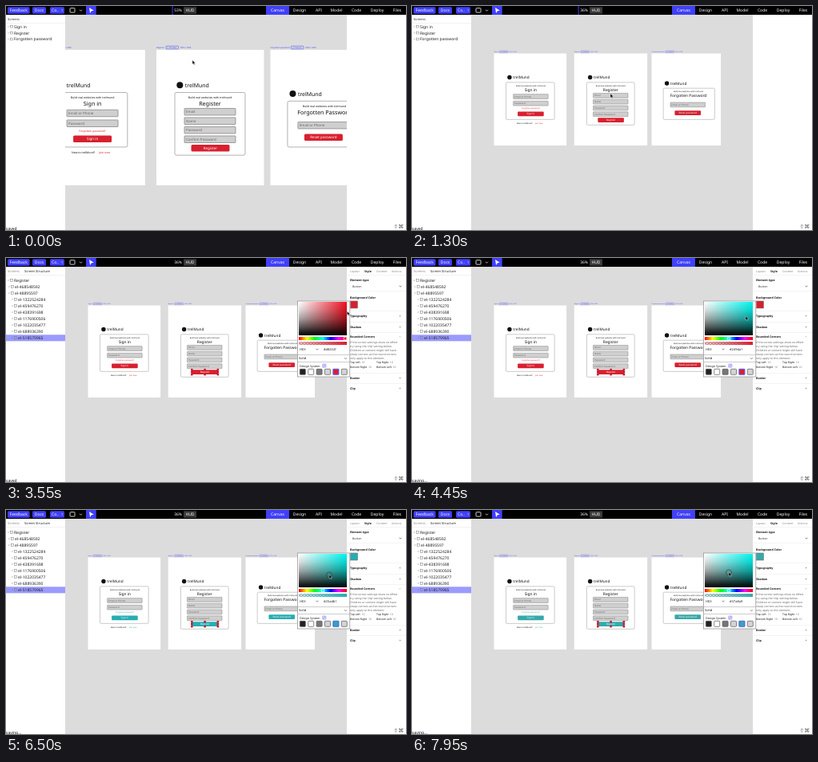
Write an HTML page that moves like this. It is 500 px wide and 281 px high and loops after 8000 ms.

```html
<!DOCTYPE html>
<html lang="en">
<head>
<meta charset="utf-8">
<title>Design editor</title>
<style>
  html, body { margin: 0; width: 100%; height: 100%; overflow: hidden; background: #fff; }
  svg { display: block; width: 100vw; height: 100vh; --accent: #d8202f; }
  text { font-family: "Noto Sans", "Open Sans", sans-serif; text-rendering: geometricPrecision; white-space: pre; }
</style>
</head>
<body>
<svg id="stage" viewBox="0 0 500 281" preserveAspectRatio="none"></svg>
<script>
const LOOP = 8000, SELECT = 1950, OPEN_PICKER = 3250, PICK_HUE = 3800, RECOLOR = 4650;
const BLUE = '#4040f8', BRAND = 'trelMund', ACCENT = 'var(--accent)';
const FOCUS = [234, 69];

const rect = (x, y, w, h, fill, extra = '') =>
  `<rect x="${x}" y="${y}" width="${w}" height="${h}" fill="${fill}" ${extra}/>`;
const text = (x, y, size, str, fill = '#111', extra = '') =>
  `<text x="${x}" y="${y}" font-size="${size}" fill="${fill}" ${extra}>${str}</text>`;
const centered = (x, y, size, str, fill, extra = '') =>
  text(x, y, size, str, fill, 'text-anchor="middle" ' + extra);
const line = (d, color = '#555', width = .6) =>
  `<path d="${d}" fill="none" stroke="${color}" stroke-width="${width}"/>`;
const chevron = (x, y, color) => line(`M${x - 1.5} ${y - .8}l1.5 1.6 1.5-1.6`, color, .7);
const group = (id, body) => `<g id="${id}">${body}</g>`;

// Mock-up screens, in stage pixels at 53 % zoom
const input = (x, y, label) =>
  rect(x, y, 64, 8.5, '#cfcfcf', 'stroke="#888" stroke-width=".8" rx=".5"') + text(x + 2, y + 5.8, 4.4, label, '#666');
const button = (x, y, label) =>
  rect(x, y, 48, 8.5, ACCENT, 'rx="1.5"') + centered(x + 24, y + 5.8, 4.5, label, '#fff', 'font-weight="500"');

function screen({ x, width, name, nameWidth, logoX, formX, formWidth, top, formHeight, title, middle, body }) {
  const tag = x + nameWidth + 2;
  return text(x, 53, 2.55, name, BLUE)
    + rect(tag, 50.2, 15.5, 3.8, 'none', `stroke="${BLUE}" stroke-width=".5" rx=".6"`)
    + text(tag + 1.5, 53, 2.5, '▷ Preview', BLUE)
    + text(tag + 18, 53, 2.6, '600 x 1200', BLUE)
    + rect(x, 55, width, 170, '#fff')
    + `<circle cx="${logoX}" cy="${top - 9.2}" r="4" fill="#111"/>`
    + text(logoX + 6.5, top - 6.7, 6.9, BRAND)
    + rect(formX, top, formWidth, formHeight, '#fff', 'stroke="#aaa" stroke-width=".9" rx="2"')
    + centered(middle, top + 7.6, 3.48, 'Build real websites with ' + BRAND.toLowerCase())
    + centered(middle, top + 16.5, 7.15, title)
    + body;
}

const handles = [231.5, 255.5, 279.5].flatMap(x =>
  [174, 178.2, 182.5].filter(y => x !== 255.5 || y !== 178.2)
    .map(y => rect(x - 1.9, y - 1.9, 3.8, 3.8, '#c8182e'))).join('');

const screens = [
  screen({
    x: 40.4, width: 133.4, name: 'Sign in', nameWidth: 8, logoX: 69, formX: 62.5, formWidth: 89.3,
    top: 108.5, formHeight: 68.5, title: 'Sign in', middle: 108,
    body: input(76, 130.3, 'Email or Phone') + input(76, 143, 'Password')
      + centered(108, 158, 3.4, 'Forgotten password?', ACCENT, 'font-weight="500"')
      + button(84, 162.5, 'Sign in')
      + text(82, 185.3, 3.5, `New to ${BRAND}?`) + text(116, 185.3, 3.5, 'Join now', ACCENT, 'font-weight="500"')
  }),
  screen({
    x: 188, width: 134.5, name: 'Register', nameWidth: 10, logoX: 217.3, formX: 211, formWidth: 88,
    top: 108.5, formHeight: 78.7, title: 'Register', middle: 255,
    body: ['Email', 'Name', 'Password', 'Confirm Password']
      .map((label, i) => input(223, 128.5 + 11.5 * i, label)).join('')
      + button(231.5, 174, 'Register') + group('handles', handles)
  }),
  screen({
    x: 330.5, width: 127.3, name: 'Forgotten password', nameWidth: 24, logoX: 358.5, formX: 352, formWidth: 94.5,
    top: 119.3, formHeight: 57.7, title: 'Forgotten Password', middle: 398,
    body: input(365, 145.5, 'Email or Phone') + button(373, 160.5, 'Reset password')
  })
].join('');

// Left panel
const treeRow = (x, y, label) =>
  line(`M${x - 7.6} ${y - 1}l1 1-1 1`, '#777', .5)
  + rect(x - 4.6, y - 1.5, 3, 2.8, 'none', 'stroke="#777" stroke-width=".5"')
  + text(x, y + 1.8, 5, label, '#222');

const screenList = text(2, 17.6, 4.1, 'Screens', '#333')
  + ['Sign in', 'Register', 'Forgotten password'].map((s, i) => treeRow(10, 25.8 + 7.9 * i, s)).join('');

const elements = ['468548592', '48895597', '1322524284', '459476270', '438391698',
  '1176900506', '1022035477', '688936390', '518579965'];
const structure = text(2, 17.6, 4.1, 'Screens', '#888') + text(23, 17.6, 4.1, 'Screen Structure', '#222')
  + rect(0, 96.3, 74, 8, '#9a9aff') + treeRow(10, 28, 'Register')
  + elements.map((id, i) => treeRow(i < 2 ? 11 : 15, 36 + 8 * i, 'el-' + id)).join('');

// Right panel
const heading = (y, str, sign = '') =>
  text(430, y, 3.6, str, '#111', 'font-weight="600"') + text(491.5, y, 4, sign, '#333');
const rule = y => rect(427, y, 73, .5, '#e8e8e8');
const notes = ['If the corner settings show no effect', "try using the 'clip' setting below.",
  'Children or content might still have', 'sharp corners as the round corners', 'only apply to this element.'];
const corner = (x, y, label) =>
  text(x, y, 3.4, `${label} <tspan fill="#777" font-weight="400" dx=".8">10</tspan>`, '#111', 'font-weight="500"');

const inspector = text(430, 17.5, 3.7, 'Layout', '#888') + text(448, 17.5, 3.6, 'Style', '#111', 'font-weight="700"')
  + text(463, 17.5, 3.6, 'Content', '#888') + text(482, 17.5, 3.6, 'Actions', '#888') + rule(21.5)
  + heading(29, 'Element type') + text(433, 37, 3.6, 'Button', '#333') + chevron(493, 35.5) + rule(41.5)
  + heading(50.5, 'Background Color') + rect(430.5, 54, 9, 9, ACCENT, 'stroke="#777" stroke-width=".6"') + rule(66)
  + heading(74, 'Typography', '+') + rule(80) + heading(87.5, 'Shadow', '+') + rule(93.5)
  + heading(100.3, 'Rounded Corners', '–')
  + notes.map((s, i) => text(430, 106.5 + 5 * i, 3.5, s, '#666')).join('')
  + corner(430, 132, 'Top Left') + corner(463, 132, 'Top Right')
  + corner(430, 138.2, 'Bottom Right') + corner(463, 138.2, 'Bottom Left') + rule(144)
  + heading(151.8, 'Border', '+') + rule(157.5) + heading(164.5, 'Clip', '+');

// Colour picker
const gradient = (id, stops, extra = '') => `<linearGradient id="${id}" ${extra}>` + stops.map(([color, opacity], i) =>
  `<stop offset="${i / (stops.length - 1)}" stop-color="${color}" stop-opacity="${opacity}"/>`).join('') + '</linearGradient>';
const rainbow = [0, 60, 120, 180, 240, 300, 360].map(h => [`hsl(${h} 100% 50%)`, 1]);
const shade = [0, .14, .35, .65, 1].map(opacity => ['#000', opacity]);
const defs = '<defs>' + gradient('white', [['#fff', 1], ['#fff', 0]])
  + gradient('dark', shade, 'x2="0" y2="1"')
  + gradient('hues', rainbow) + gradient('fade', [[ACCENT, .25], [ACCENT, 1]])
  + '<pattern id="checker" width="4" height="4" patternUnits="userSpaceOnUse"><path d="M0 0h2v4h2v-2H0z" fill="#bbb"/></pattern>'
  + '<clipPath id="view"><path d="M74 11h352v270H74z"/></clipPath></defs>';

const swatch = (color, i) => rect(367.3 + 10.4 * i, 139.3, 7, 7, color,
  i === 4 ? 'stroke="#5a5af0" stroke-width="1.1" rx=".8"' : 'stroke="#555" stroke-width=".7" rx=".8"');
const area = fill => rect(366, 55, 60, 42, fill);
const picker = rect(364.5, 54, 65.3, 95, '#fff', 'stroke="#999" stroke-width=".8"')
  + group('hueArea', area('inherit')) + area('url(#white)') + area('url(#dark)')
  + '<circle id="knob" r="3.6" fill="none" stroke="#444" stroke-width=".7"/>'
  + rect(366, 99, 60, 4, 'url(#hues)') + '<circle id="hueKnob" cy="101" r="2" fill="none" stroke="#fff" stroke-width=".8"/>'
  + rect(366, 105, 60, 4, 'url(#checker)') + rect(366, 105, 60, 4, 'url(#fade)')
  + text(367, 116, 4, 'HEX', '#222') + chevron(389, 114.5) + text(397, 116, 4, '<tspan id="hex"></tspan>', '#222')
  + line('M365 121.5h64M365 130.5h64', '#aaa', .6)
  + text(366, 127.3, 4, 'Solid', '#222') + chevron(424.5, 126)
  + text(367, 136.6, 3.7, 'Design System', '#222')
  + rect(395.7, 133, 4.2, 4.2, '#e4e4ff', 'stroke="#6a6af8" stroke-width=".5" rx=".6"') + line('M396.7 136.2l2.2-2.2', BLUE)
  + ['#222', '#fff', '#777', '#d4d4d4', ACCENT, '#d4d4d4'].map(swatch).join('');

// Top bar
const pill = (x, w, label) => rect(x, 1.3, w, 8.5, BLUE, 'rx="1.5"') + centered(x + w / 2, 7.4, 5, label, '#fff');
const tabs = [['Canvas', 339.5], ['Design', 367], ['API', 391], ['Model', 413], ['Code', 438], ['Deploy', 464], ['Files', 489]];
const topBar = rect(0, 0, 500, 11, '#000') + pill(2, 27.5, 'Feedback') + pill(33, 17, 'Docs')
  + rect(55, 1.3, 18, 8.5, BLUE, 'rx="1.5"') + text(57, 7.4, 5, 'Co..', '#fff') + text(68.8, 7.2, 4.4, '1', '#fff')
  + rect(80, 2.7, 6, 5.4, 'none', 'stroke="#fff" stroke-width=".8" rx=".8"') + chevron(93.5, 5.5, '#fff')
  + rect(100, 0, 12.7, 11, BLUE) + '<path d="M104 2l5.8 3.8-3 .5-1.7 2.6z" fill="#fff"/>'
  + rect(207.6, 0, 1, 11, BLUE, 'id="toolEdge"')
  + '<text id="zoom" x="215" y="7.4" font-size="4.9" fill="#fff" text-anchor="middle"></text>'
  + rect(222, 1.3, 16, 8.5, '#3a3a3a') + centered(230, 7.4, 5, 'HUD', '#fff')
  + rect(325, 0, 29, 11, BLUE)
  + tabs.map(([label, x]) => centered(x, 7.4, 5.05, label, '#fff')).join('');

document.getElementById('stage').innerHTML = defs
  + rect(0, 0, 500, 281, '#fff') + rect(74, 11, 352, 270, '#dcdcdc')
  + `<g clip-path="url(#view)">${group('world', screens)}</g>`
  + rect(0, 21, 74, .5, '#e4e4e4') + group('list', screenList) + group('tree', structure)
  + text(0, 280.6, 5, '<tspan id="status"></tspan>')
  + group('inspector', inspector) + group('picker', picker) + topBar
  + text(484.5, 279, 7, '⇧⌘', '#555', 'style="font-family:\'DejaVu Sans\',sans-serif"')
  + '<path id="cursor" d="M0 0v5l1.2-1 .8 1.9.9-.4-.8-1.8h1.7z" fill="#000" stroke="#fff" stroke-width=".35"/>';

const el = id => document.getElementById(id);
const show = (id, on) => el(id).setAttribute('display', on ? 'inline' : 'none');

// Keys are [time, ...values]; smooth keys ease in and out.
function track(keys, t, smooth = true) {
  const next = keys.findIndex(k => k[0] > t);
  if (next < 0) return keys.at(-1).slice(1);
  if (next === 0) return keys[0].slice(1);
  const a = keys[next - 1], b = keys[next];
  let p = (t - a[0]) / (b[0] - a[0]);
  if (smooth) p = p * p * (3 - 2 * p);
  return a.slice(1).map((v, i) => v + (b[i + 1] - v) * p);
}

const pointer = [[0, 233, 68], [900, 233, 68], [1300, 248, 110], [1700, 248, 142], [2100, 250, 143],
  [2700, 373, 98.5], [3100, 434, 58], [3450, 434, 58], [3800, 396, 101], [4050, 397, 101],
  [4450, 417, 73], [5200, 411, 78], [6500, 404, 81], [7950, 396, 78]];
const pickedColor = [[4450, 36, 157, 161], [6500, 37, 173, 177], [7950, 55, 168, 169]];
const toHex = rgb => '#' + rgb.map(v => Math.round(v).toString(16).padStart(2, '0')).join('');

function draw(t) {
  const zoom = 36 + 17 * Math.max(0, 1 - t / 900) ** 1.58;
  const k = zoom / 53, [fx, fy] = FOCUS;
  el('world').setAttribute('transform', `translate(${fx * (1 - k)} ${fy * (1 - k)}) scale(${k})`);
  el('zoom').textContent = Math.round(zoom) + '%';

  const selected = t >= SELECT, recolored = t >= RECOLOR, hueSet = t >= PICK_HUE;
  show('list', !selected);
  show('toolEdge', !selected);
  for (const id of ['tree', 'inspector', 'handles']) show(id, selected);
  show('picker', t >= OPEN_PICKER);
  show('knob', recolored);

  const [x, y] = track(pointer, t);
  el('cursor').setAttribute('transform', `translate(${x} ${y})`);
  el('knob').setAttribute('transform', `translate(${x} ${y + .5})`);

  const picked = toHex(track(pickedColor, t, false));
  el('stage').style.setProperty('--accent', recolored ? picked : '#d8202f');
  el('hueArea').setAttribute('fill', hueSet ? '#00f5ee' : '#f01020');
  el('hueKnob').setAttribute('cx', hueSet ? 396 : 424);
  el('hex').textContent = hueSet ? picked : '#d8202f';
  el('status').textContent = t >= 3900 ? 'saving...' : 'saved';
}

const start = performance.now();
function tick() {
  draw((performance.now() - start) % LOOP);
  requestAnimationFrame(tick);
}
tick();
</script>
</body>
</html>
```
